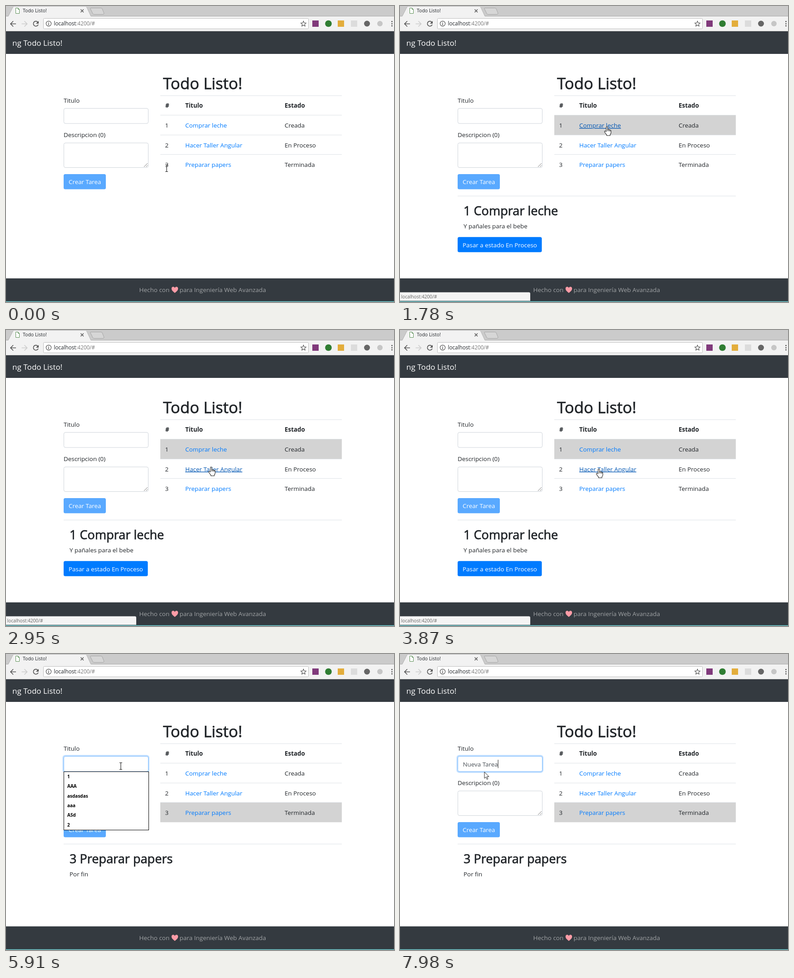
Write an HTML page that moves like this. It is 855 px wide and 655 px high and loops after 8 s.

```html
<!DOCTYPE html>
<html lang="es">
<head>
<meta charset="utf-8">
<title>Todo Listo!</title>
<style>
  html, body { margin: 0; width: 100%; height: 100%; overflow: hidden; background: #fff; }
  svg { display: block; width: 855px; height: 655px; font: 13.4px "Open Sans", "Noto Sans", sans-serif; fill: #212529; }
  .b { font-weight: 700; }
  .h { stroke: #212529; stroke-width: .75; }
  .link { fill: #007bff; }
  .link.on { fill: #0056b3; text-decoration: underline; }
  .line { stroke: #dee2e6; }
  .field { fill: #fff; stroke: #ced4da; }
  .ico { fill: none; stroke: #555; stroke-width: 1.7; }
</style>
</head>
<body>
<svg id="stage" viewBox="0 0 855 655"></svg>
<script>
const LOOP = 8000, STEP = 76.73, ALERT_SHIFT = 101.3;
const stage = document.getElementById('stage');

const tasks = [
  { title: 'Comprar leche', state: 'Creada', note: 'Y pañales para el bebe', next: 'En Proceso' },
  { title: 'Hacer Taller Angular', state: 'En Proceso', note: 'Con componentes', next: 'Terminada' },
  { title: 'Preparar papers', state: 'Terminada', note: 'Por fin', next: '' }
];
const rowTop = [242, 285.5, 329];

// time, x, y of the hot spot, pointer shape until the next key
const path = [
  [0, 354, 359, 'beam'], [70, 354, 359, 'arrow'], [230, 302, 350, 'beam'], [380, 250, 292, 'arrow'],
  [450, 222, 258, 'beam'], [535, 208, 243, 'beam'], [850, 208, 243, 'arrow'], [990, 483, 247, 'arrow'],
  [1090, 483, 247, 'arrow'], [1200, 476, 260, 'hand'], [1375, 456, 267, 'hand'], [1860, 456, 267, 'hand'],
  [1920, 452, 282, 'arrow'], [1990, 436, 303, 'hand'], [2060, 420, 328, 'arrow'], [2130, 398, 352, 'arrow'],
  [2370, 284, 472, 'arrow'], [2450, 287, 470, 'arrow'], [2530, 300, 462, 'arrow'], [2640, 300, 462, 'arrow'],
  [2860, 440, 320, 'arrow'], [2910, 452, 303, 'hand'], [3100, 452, 303, 'hand'], [3200, 436, 330, 'arrow'],
  [3430, 337, 428, 'arrow'], [3620, 425, 330, 'arrow'], [3660, 440, 306, 'hand'], [3780, 442, 304, 'hand'],
  [3850, 437, 308, 'hand'], [4090, 437, 308, 'hand'], [4160, 437, 325, 'arrow'], [4230, 437, 345, 'hand'],
  [4820, 437, 345, 'hand'], [4910, 415, 332, 'arrow'], [5130, 320, 272, 'arrow'], [5200, 292, 256, 'beam'],
  [5350, 253, 248, 'beam'], [7820, 253, 248, 'arrow'], [7970, 186, 261, 'arrow'], [8000, 186, 261, 'arrow']
];

// moment each letter is typed
const typed = 'Nueva Tarea';
const strokes = [6290, 6520, 6600, 6680, 6830, 6980, 7210, 7290, 7520, 7600, 7670];

const text = (x, y, s, attrs = '') => `<text x="${x}" y="${y}" ${attrs}>${s}</text>`;
const rect = (x, y, w, h, attrs = '') => `<rect x="${x}" y="${y}" width="${w}" height="${h}" ${attrs}/>`;
const line = (x, y, x2) => `<path class="line" d="M${x} ${y}H${x2}"/>`;
const size = (px, rest = '') => `font-size="${px}" ${rest}`;

function browser() {
  return rect(0, 0, 855, 23, 'fill="#cbcbcb"') +
    rect(0, 22.5, 855, 33, 'fill="#f2f2f2"') +
    '<path d="M0 22.5H5L16 1.5Q17 .5 19 .5H174Q176 .5 177 2L187 22.5H855" fill="none" stroke="#aaa"/>' +
    '<path d="M5 23.5L16 2Q17 1 19 1H174Q176 1 177 2L187 23.5Z" fill="#f2f2f2"/>' +
    '<path d="M187 4.5H209Q211 4.5 212 6L216 16Q216 18.5 214 18.5H194Q192 18.5 191 16.5L186 6Q185.5 4.5 187 4.5Z" fill="#d6d6d6" stroke="#a5a5a5"/>' +
    '<path d="M21.5 4.5H26.5L29.5 7.5V16.5H21.5ZM26.5 4.5V7.5H29.5" fill="#fff" stroke="#5a8f55"/>' +
    text(37, 14, 'Todo Listo!', size(10.5)) +
    '<path class="ico" d="M164.5 7.5L171 14M171 7.5L164.5 14" style="stroke-width:1.5"/>' +
    '<path class="ico" d="M22 39.5H10M16 33.5L10 39.5L16 45.5"/>' +
    '<path class="ico" d="M34.5 39.5H46.5M40.5 33.5L46.5 39.5L40.5 45.5" style="stroke:#ccc"/>' +
    '<path class="ico" d="M70 35.5A5.5 5.5 0 1 0 71 41"/><path d="M72 33V39H66Z" fill="#555"/>' +
    rect(82.5, 27.5, 584, 23, 'rx="2" fill="#fff" stroke="#bdbdbd"') +
    '<circle class="ico" cx="94" cy="39" r="5.6" style="stroke-width:1.2"/><path class="ico" d="M94 38V42.5M94 35.5V37" style="stroke-width:1.5"/>' +
    text(105.5, 43, 'localhost<tspan fill="#777">:4200/#</tspan>', size(11.7)) +
    '<path class="ico" d="M655.5 33.5L657.2 37.3L661.2 37.7L658.2 40.4L659.1 44.5L655.5 42.4L651.9 44.5L652.8 40.4L649.8 37.7L653.8 37.3Z" style="stroke-width:1.2"/>' +
    rect(675, 32, 14, 14, 'fill="#80397b"') +
    '<circle cx="710.5" cy="39" r="7.3" fill="#2f7d32"/>' +
    rect(731, 32, 14, 14, 'fill="#e3ad3c"') +
    rect(760, 32, 14, 14, 'fill="#dcdcdc"') +
    '<circle cx="795.5" cy="39" r="6.5" fill="#666"/>' +
    '<circle cx="824" cy="39" r="6" fill="#c6c6c6"/>' +
    [34.5, 39.3, 44].map(y => `<circle cx="850.5" cy="${y}" r="1.4" fill="#555"/>`).join('') +
    rect(0, 55, 855, 1, 'fill="#c4c4c4"');
}

function frame() {
  const heart = '<path d="M372 635C367 631 364.8 628.5 364.8 625.2C364.8 620.6 370.3 620 372 623.8C373.7 620 379.2 620.6 379.2 625.2C379.2 628.5 377 631 372 635Z" fill="#ff9ca7"/>';
  const muted = size(13.5, 'fill="#a0a3a5"');
  return rect(0, 56, 855, 50, 'fill="#343a40"') +
    text(14, 88, 'ng Todo Listo!', size(17.1, 'fill="#fff"')) +
    rect(0, 602.7, 855, 50.3, 'fill="#343a40"') +
    rect(0, 653, 855, 1, 'fill="#2f8c90"') +
    rect(0, 654, 855, 1, 'fill="#9cc8ca"') +
    text(293.5, 633, 'Hecho con', muted) + heart +
    text(382.5, 633, 'para Ingeniería Web Avanzada', muted);
}

function table() {
  const head = text(346, 184.3, 'Todo Listo!', size(34.7, 'class="h"')) +
    text(351, 225, '#', 'class="b"') + text(395, 225, 'Titulo', 'class="b"') + text(614, 225, 'Estado', 'class="b"');
  const rows = tasks.map((task, i) => {
    const y = rowTop[i] + 27;
    return rect(340, rowTop[i], 400, 43.3, `id="row${i}" fill="#d3d3d3"`) +
      text(350.5, y, i + 1) +
      text(395, y, task.title, `id="link${i}" class="link"`) +
      text(614, y, task.state);
  }).join('');
  return head + rows + [198.5, 241.5, 285.5, 328.5].map(y => line(340, y, 740)).join('');
}

function form() {
  const alertLines = ['El titulo debe tener', 'una longitud minima', 'de 5 caracteres'];
  return text(127, 214, 'Titulo') +
    rect(126, 225, 188.5, 36.5, 'id="ring" rx="4.5" fill="none" stroke="#bfdeff" stroke-width="3"') +
    rect(127.5, 226.5, 186, 33.5, 'id="input" class="field" rx="3.5"') +
    text(138.5, 248.5, '', 'id="value" fill="#495057"') +
    rect(138, 234, 1, 18.5, 'id="caret" fill="#222"') +
    '<g id="alert">' + rect(127.5, 274.7, 186, 86.5, 'rx="3.5" fill="#f8d7da" stroke="#f5c6cb"') +
    alertLines.map((s, i) => text(145.5, 301.5 + i * 21.3, s, 'fill="#721c24"')).join('') + '</g>' +
    '<g id="lower">' + text(127, 290, 'Descripcion (0)') +
    rect(127.5, 303, 186, 54.5, 'class="field" rx="3.5"') +
    '<path d="M304 356L312 348M308.5 356L312 352.5" stroke="#777" fill="none"/>' +
    rect(127, 372, 93, 33.5, 'rx="3.5" fill="#59a9ff"') +
    text(138, 394, 'Crear Tarea', 'fill="#fff"') +
    '<g id="detail">' + line(127, 420.5, 740) +
    text(140, 463, '', size(27.1, 'id="title" class="h"')) +
    text(140, 491.5, '', 'id="note"') +
    '<g id="action">' + rect(127, 511.3, 185.5, 33.5, 'rx="3.5" fill="#007bff"') +
    text(138, 533.5, '', 'id="label" fill="#fff"') + '</g></g></g>';
}

function overlays() {
  const items = ['1', 'AAA', 'asdasdas', 'aaa', 'ASd', '2'];
  return '<g id="menu">' + rect(127.5, 260.5, 187, 129, 'fill="#fff" stroke="#000"') +
    items.map((s, i) => text(135, 275 + i * 21.3, s, size(10, 'class="b" fill="#000"'))).join('') + '</g>' +
    '<g id="status"><path d="M0 633.5H284Q287 633.5 287 636.5V652.5H0Z" fill="#f4f4f4"/>' +
    text(2.5, 647, 'localhost:4200/#', size(10.2, 'fill="#666"')) + '</g>' +
    '<g id="pointer">' +
    '<path id="arrow" d="M0 0V14.2L3.3 11.2L5.6 16.5L7.8 15.5L5.5 10.4H10Z" fill="#fff" stroke="#222"/>' +
    '<path id="beam" d="M-3 -7.5H-1Q0 -7.5 0 -6.5Q0 -7.5 1 -7.5H3M0 -6.5V6.5M-3 7.5H-1Q0 7.5 0 6.5Q0 7.5 1 7.5H3" fill="none" stroke="#222" stroke-width="1.2"/>' +
    '<path id="hand" d="M-1.5 10.5V1.5Q-1.5 0 0 0Q1.5 0 1.5 1.5V6.5Q3.8 5.2 4.3 7Q6.3 6 6.9 7.9Q9 7.3 9 9.5V13Q9 16 7 17.5V19.8H-.5V18Q-3 15.5 -5.3 11.5Q-5.8 9.5 -4 9.5Q-2.8 9.8 -1.5 11.5M1.5 6.5V10M4.3 7V10.3M6.9 8V10.8" fill="#fff" stroke="#222" stroke-width="1.1"/></g>';
}

stage.innerHTML = rect(0, 0, 855, 655, 'fill="#fff"') + browser() + frame() + table() + form() + overlays();
const el = {};
stage.querySelectorAll('[id]').forEach(node => el[node.id] = node);

const show = (node, on) => node.setAttribute('visibility', on ? 'inherit' : 'hidden');
const ramp = (t, a, b) => Math.min(1, Math.max(0, (t - a) / (b - a)));
const within = (t, a, b) => t >= a && t < b;

// the pointer is sampled about 13 times a second
function pointerAt(t) {
  const s = Math.floor((t + 4) / STEP) * STEP;
  let i = 0;
  while (i < path.length - 2 && path[i + 1][0] <= s) i++;
  const [a, x, y, kind] = path[i], [b, x2, y2] = path[i + 1];
  const k = ramp(s, a, b);
  return { x: x + (x2 - x) * k, y: y + (y2 - y) * k, kind };
}

function render(t) {
  const p = pointerAt(t);
  el.pointer.setAttribute('transform', `translate(${p.x} ${p.y})`);
  for (const kind of ['arrow', 'beam', 'hand']) show(el[kind], kind === p.kind);

  const chosen = t < 1690 ? -1 : t < 4100 ? 0 : t < 4795 ? 1 : 2;
  tasks.forEach((task, i) => {
    show(el['row' + i], i === chosen);
    const over = p.kind === 'hand' && within(p.y, rowTop[i], rowTop[i] + 43);
    el['link' + i].classList.toggle('on', over);
  });

  const task = tasks[chosen];
  show(el.detail, task);
  show(el.action, task && task.next);
  if (task) {
    el.title.textContent = `${chosen + 1} ${task.title}`;
    el.note.textContent = task.note;
    el.label.textContent = 'Pasar a estado ' + task.next;
  }

  const count = strokes.filter(s => s <= t).length;
  el.value.textContent = typed.slice(0, count).replace(/ $/, '\u00a0');
  const focus = ramp(t, 5330, 5500);
  el.ring.setAttribute('opacity', focus);
  el.input.style.stroke = focus > 0.5 ? '#80bdff' : '';
  show(el.caret, within(t, 5410, 5905) || count);
  el.caret.setAttribute('x', 138 + (count ? el.value.getComputedTextLength() + 0.5 : 0));
  show(el.menu, within(t, 5500, 6370));

  const short = count > 0 && count < 5;
  show(el.alert, short);
  el.lower.setAttribute('transform', `translate(0 ${short ? ALERT_SHIFT : 0})`);

  const first = ramp(t, 1500, 1650) - ramp(t, 2270, 2430);
  const second = ramp(t, 2870, 2950) - ramp(t, 5200, 5380);
  el.status.setAttribute('opacity', first + second);
}

const start = performance.now();
function tick() {
  render((performance.now() - start) % LOOP);
  requestAnimationFrame(tick);
}
render(0);
requestAnimationFrame(tick);
</script>
</body>
</html>
```
